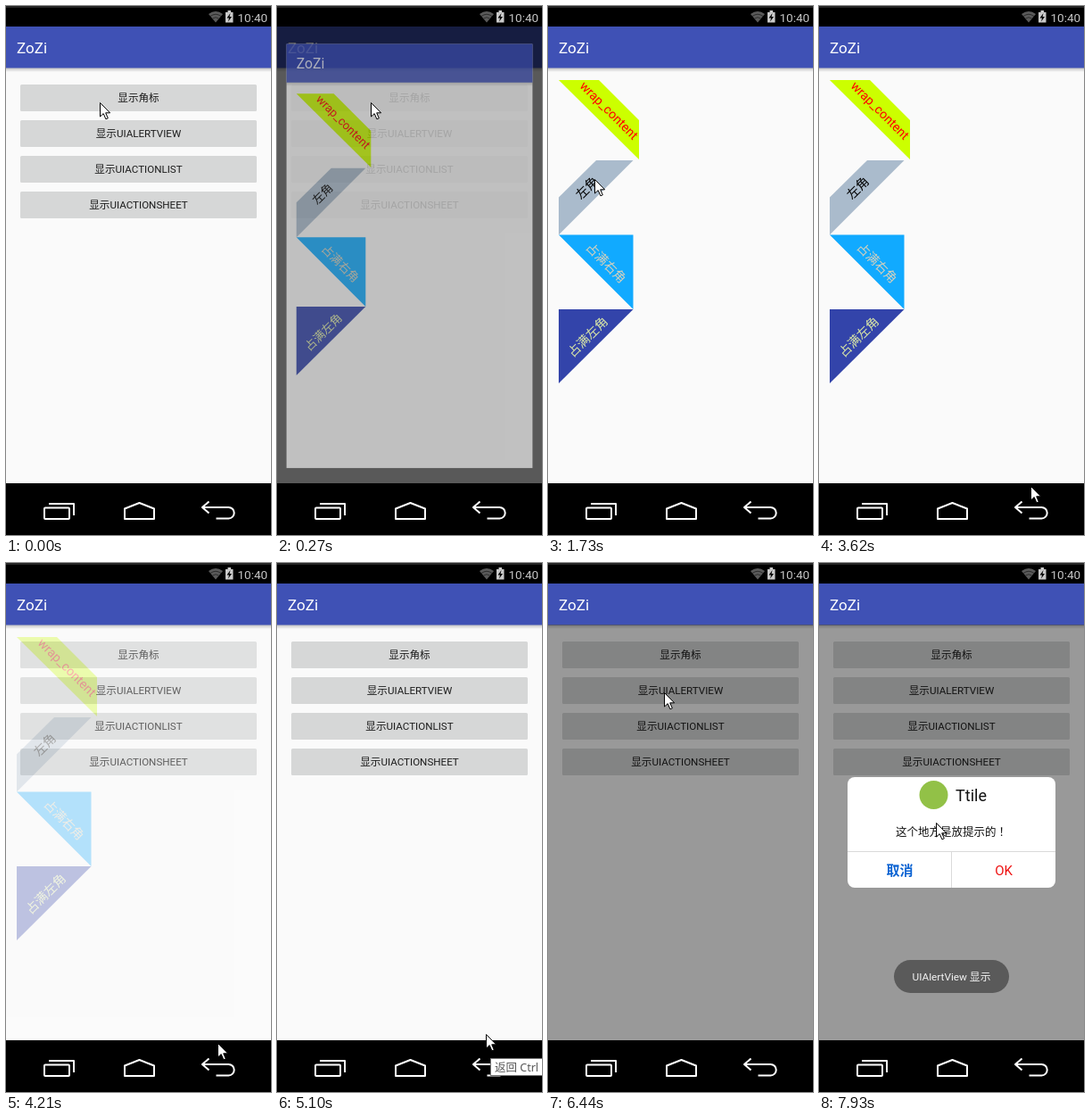
These frames come from a looping animation (297x593 px, 8 s). An HTML page:

```html
<!DOCTYPE html>
<html lang="zh-CN">
<head>
<meta charset="utf-8">
<style>
  html, body { margin: 0; width: 100%; height: 100%; overflow: hidden; background: #000; }
  svg { display: block; width: 297px; height: 593px; font-family: Roboto, "Noto Sans CJK SC", "Noto Sans CJK", sans-serif; }
  .mid { text-anchor: middle; }
  .icon { fill: none; stroke: #fff; stroke-width: 2; stroke-linejoin: round; }
</style>
</head>
<body>
<svg viewBox="0 0 297 593">
  <defs>
    <linearGradient id="shade" x2="0" y2="1">
      <stop stop-opacity=".24"/><stop offset="1" stop-opacity="0"/>
    </linearGradient>
    <radialGradient id="halo">
      <stop stop-color="#fff" stop-opacity=".8"/><stop offset="1" stop-color="#fff" stop-opacity="0"/>
    </radialGradient>
    <g id="base">
      <rect y="23" width="297" height="512" fill="#fafafa"/>
      <rect y="69" width="297" height="5" fill="url(#shade)"/>
      <rect y="23" width="297" height="46.5" fill="#3f51b5"/>
      <text x="12" y="53" font-size="17" fill="#fff">ZoZi</text>
    </g>
  </defs>
  <rect width="297" height="593"/>

  <g id="menu"><use href="#base"/></g>
  <g id="labels"><use href="#base"/></g>

  <rect id="dim" y="69" width="297" height="466" opacity=".39"/>
  <g id="dialog">
    <rect x="32" y="240" width="233" height="124" rx="8" fill="#fff"/>
    <circle cx="128.5" cy="260" r="16" fill="#92c147"/>
    <text x="153" y="267" font-size="18" fill="#111">Ttile</text>
    <text x="86" y="306" font-size="12.5" fill="#111">这个地方是放提示的<tspan dx="3">！</tspan></text>
    <path d="M32 323.5H265M148.5 323.5V364" stroke="#dadada"/>
    <g class="mid" font-size="15">
      <text x="90.5" y="350" font-weight="700" fill="#0a62d2">取消</text>
      <text x="207" y="350" fill="#ee1111">OK</text>
    </g>
  </g>
  <g id="toast">
    <rect x="84" y="445" width="129" height="37" rx="18.5" fill="#5a5a5a"/>
    <text class="mid" x="148.5" y="468" font-size="11.8" fill="#f4f4f4">UIAlertView 显示</text>
  </g>

  <rect width="297" height="23"/>
  <rect width="297" height="2" fill="#262626"/>
  <path d="M235 18.5L227 9Q235 3 243 9Z" fill="#5a5a5a"/>
  <path d="M229 11.5Q235 7 241 11.5M231.5 14Q235 11.5 238.5 14" fill="none" stroke="#2c2c2c"/>
  <path d="M246 7H248.5V5H252V7H254.5V18.5H246Z" fill="#cacaca"/>
  <path d="M251.5 8L247.5 13.5H250L249 17.5L253 12H250.5Z"/>
  <text x="259.5" y="17.5" font-size="13.5" fill="#c4c4c4">10:40</text>

  <rect y="535" width="297" height="58"/>
  <circle id="glow" cx="238" cy="565" r="28" fill="url(#halo)"/>
  <g class="icon">
    <rect x="43" y="562.5" width="28" height="12.5" rx="1"/>
    <path d="M48 558H76V571"/>
    <path d="M133 575V563.5L149.5 557L166 563.5V575Z"/>
    <path d="M227.5 555.5L220 562L227.5 568.5M220 562H249.5A6.2 6.2 0 0 1 249.5 574.4H235.5"/>
  </g>
  <g id="tip">
    <rect x="239.5" y="555.5" width="70" height="19" fill="#fff" stroke="#767676"/>
    <text x="244" y="569.5" font-size="12.5" fill="#575757" font-family="Noto Sans, Noto Sans CJK SC, sans-serif">返回 Ctrl</text>
  </g>
  <path id="cursor" d="M.5 .5V16L4.2 12.6L6.9 18.8L9.3 17.8L6.7 11.8H11.6Z" fill="#fff" stroke="#000"/>
</svg>
<script>
const LOOP = 8000;
const el = id => document.getElementById(id);
const add = (id, markup) => el(id).insertAdjacentHTML('beforeend', markup);

['显示角标', '显示UIALERTVIEW', '显示UIACTIONLIST', '显示UIACTIONSHEET'].forEach((label, i) => {
  const y = 88 + 40 * i;
  add('menu', `<rect id="button${i}" x="16" y="${y}" width="265" height="30" rx="1.5" fill="#d6d7d7"/>
    <text class="mid" x="148.5" y="${y + 19.3}" font-size="11.6" fill="#1c1c1c">${label}</text>`);
});

// Corner labels: points, fill, text, text colour, text centre, angle
[
  ['12,83 57,83 102,128 102,172', '#cf0', 'wrap_content', '#f00', 68.5, 117, 45],
  ['54,173 95.5,173 12,256.5 12,214.5', '#abc', '左角', '#000', 43.5, 204, -45],
  ['12,256.5 95.5,256.5 95.5,340', '#1af', '占满右角', '#d6d0bc', 65, 288, 45],
  ['12,340 95.5,340 12,423', '#34a', '占满左角', '#dbe8a6', 44.5, 371, -45]
].forEach(([points, fill, text, color, x, y, angle]) => add('labels',
  `<polygon points="${points}" fill="${fill}"/>
   <text class="mid" y="5" font-size="14.2" fill="${color}" transform="translate(${x} ${y}) rotate(${angle})">${text}</text>`));

// Time, x, y of the pointer
const pointer = [
  [0, 105, 108], [1070, 110, 150], [1190, 114, 189], [1340, 106, 226], [1460, 82, 183],
  [1580, 65, 137], [1730, 52, 194], [1880, 49, 232], [2000, 65, 295], [2120, 97, 364],
  [2240, 131, 428], [2390, 199, 508], [2550, 228, 533], [2670, 237, 538], [5100, 234, 528],
  [5220, 196, 335], [5370, 172, 255], [5490, 146, 188], [5610, 130, 146], [5760, 130, 145],
  [7660, 131, 205], [7780, 131, 278], [7930, 131, 291]
];
const opening = [[0, 0], [270, .29], [390, .69], [550, 1]];
const labelFade = [[0, 1], [4210, .3], [4330, 0]];
const glow = [[0, 0], [2670, .35], [2820, .6], [3380, .4], [3500, .2], [3620, 0]];
const toast = [[0, 0], [6710, .5], [6830, 1]];

const hold = (steps, t) => steps.findLast(step => step[0] <= t).slice(1);
const fade = (id, value) => el(id).setAttribute('opacity', value);
const show = (id, on) => el(id).setAttribute('visibility', on ? 'visible' : 'hidden');

function draw(t) {
  const [p] = hold(opening, t);
  const eased = 1 - (1 - p) ** 3;
  const scale = .8 + .2 * eased;
  el('labels').setAttribute('transform', `translate(148.5 296.5) scale(${scale}) translate(-148.5 -296.5)`);
  fade('labels', eased * hold(labelFade, t)[0]);
  fade('menu', t < 4210 ? 1 - eased : 1);
  fade('glow', hold(glow, t)[0]);
  fade('toast', hold(toast, t)[0]);
  show('tip', t >= 4330 && t < 5370);
  show('dim', t >= 6440);
  show('dialog', t >= 6560);
  el('button1').setAttribute('fill', t >= 6160 && t < 6440 ? '#bcbdbd' : '#d6d7d7');
  el('cursor').setAttribute('transform', `translate(${hold(pointer, t)})`);
}

const start = performance.now();
function tick() {
  draw((performance.now() - start) % LOOP);
  requestAnimationFrame(tick);
}
tick();
</script>
</body>
</html>
```
